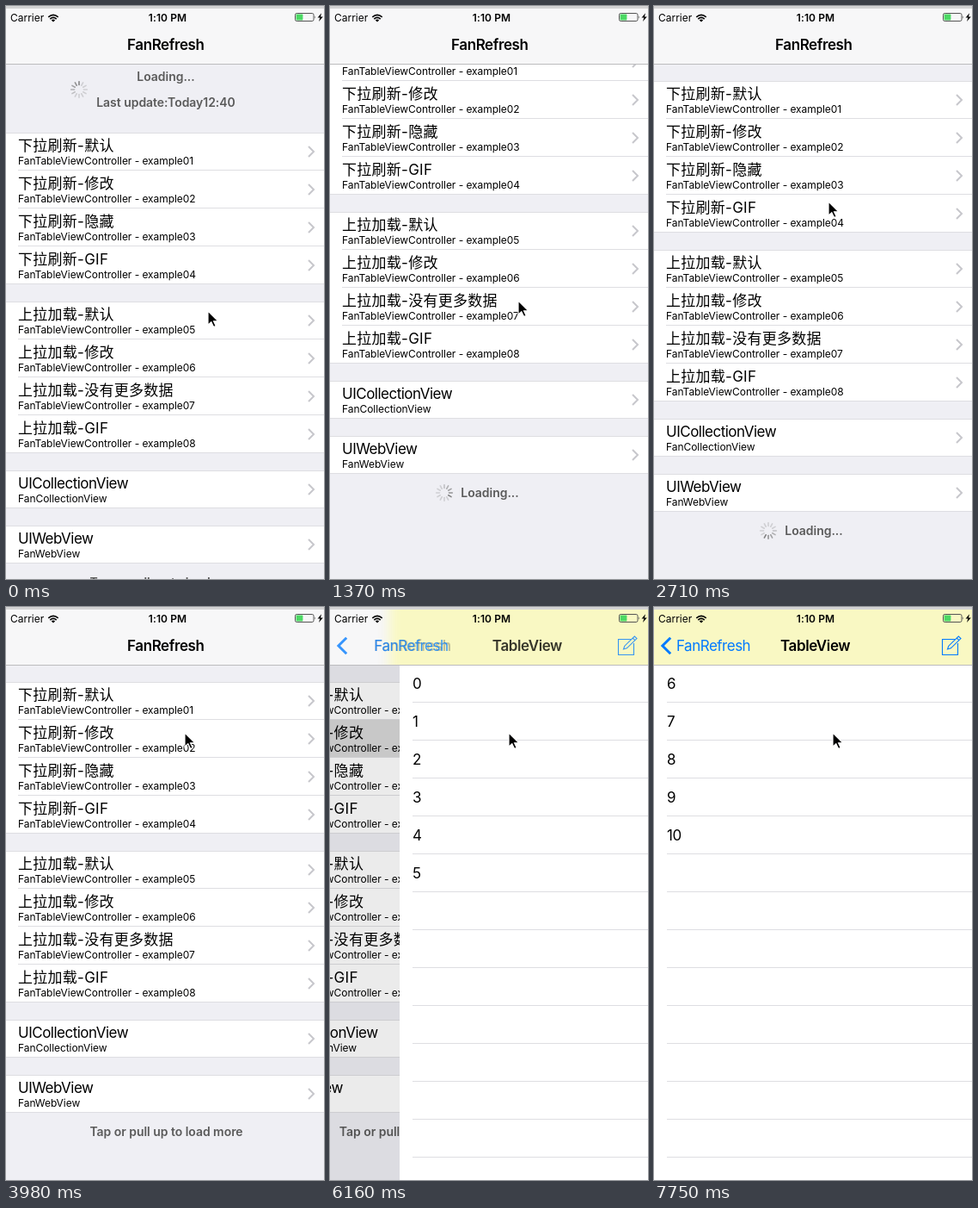
Write an HTML page that moves like this. It is 370 px wide and 665 px high and loops after 8 s.

```html
<!DOCTYPE html>
<html lang="zh-CN">
<head>
<meta charset="utf-8">
<title>Pull to refresh</title>
<style>
html, body { margin: 0; width: 100%; height: 100%; overflow: hidden; background: #fff; }
#stage { position: relative; width: 370px; height: 665px; overflow: hidden; font-family: Inter, "Noto Sans CJK SC", "Noto Sans CJK", sans-serif; color: #000; }
#stage div, #stage svg { position: absolute; }
svg { overflow: visible; }
.view { left: 0; top: 0; width: 370px; height: 665px; overflow: hidden; }
.layer { left: 0; top: 0; width: 370px; height: 100%; }
#list { background: #efeff4; }
#table { background: #fff; }
#dim { background: #000; }
#nav { left: 0; top: 3px; width: 370px; height: 64px; overflow: hidden; background: #f7f7f8; }
#tint { left: -12px; top: -14px; width: 394px; height: 110px; background: #f9f8c3; filter: blur(7px); }
.text { white-space: pre; line-height: 20px; height: 20px; }
.mid { transform: translateX(-50%); }
.main { font-size: 17px; letter-spacing: -.5px; }
.cjk { letter-spacing: .27px; }
.sub { font-size: 12px; letter-spacing: -.06px; }
.title { font-size: 17px; font-weight: 600; letter-spacing: -.4px; }
.hint { font-size: 14px; font-weight: 600; letter-spacing: -.04px; color: #5a5a5a; }
.red { color: #ff2a12; }
.blue { color: #007aff; }
.status { font-size: 12px; }
.bold { font-weight: 600; letter-spacing: .1px; }
</style>
</head>
<body>
<div id="stage">
  <div class="view" id="list"><div class="layer" id="listBody"></div><div class="layer" id="dim"></div></div>
  <div class="view" id="table"><div class="layer" id="tableBody"></div></div>
  <div id="nav"><div id="tint"></div></div>
  <div class="layer" id="bar"></div>
  <svg id="cursor" width="14" height="21" style="left:0;top:0">
    <path d="M0 0V16.2L3.8 12.8L6.6 18.6L9.3 17.4L6.6 11.8H11.8Z" fill="#000" stroke="#fff" stroke-width="1.2"/>
  </svg>
</div>
<script>
const LOOP = 8000;
const $ = id => document.getElementById(id);

// Start, end and number of picture changes
const BURSTS = [[50, 520, 7], [760, 1190, 7], [1370, 2130, 12], [2190, 2990, 13], [3100, 3860, 13],
  [3920, 3980, 2], [5840, 6580, 11], [6700, 7490, 12], [7580, 7750, 3]];

const CURSOR = [[0, 235, 354], [50, 234, 357], [520, 209, 443], [740, 209, 442], [760, 208, 441],
  [1190, 219, 342], [2190, 219, 342], [2560, 207, 220], [2990, 190, 252], [3100, 189, 250],
  [3860, 208, 149], [3980, 208, 146]];

function add(parent, html) {
  parent.insertAdjacentHTML("beforeend", html);
  return parent.lastElementChild;
}
function text(parent, str, x, y, cls) {
  return add(parent, `<div class="text ${cls}" style="left:${x}px;top:${y - 10}px">${str}</div>`);
}
function box(parent, x, y, w, h, color) {
  return add(parent, `<div style="left:${x}px;top:${y}px;width:${w}px;height:${h}px;background:${color}"></div>`);
}
function art(parent, x, y, shapes) {
  return add(parent, `<svg width="1" height="1" style="left:${x}px;top:${y}px" fill="none">${shapes}</svg>`);
}
function spinner(parent, x, y) {
  let spokes = "";
  for (let i = 0; i < 12; i++) {
    const alpha = Math.max(.25, .85 - i * .12);
    spokes += `<path d="M0 -5.5V-9.3" transform="rotate(${-30 * i})" opacity="${alpha}"/>`;
  }
  return art(parent, x, y, `<g stroke="#707070" stroke-width="1.6" stroke-linecap="round">${spokes}</g>`);
}
function group(parent) {
  return add(parent, '<div class="layer"></div>');
}

// First screen
const listBody = $("listBody");
const listHead = group(listBody);
text(listHead, "Loading...", 186, 22, "hint mid");
text(listHead, "Last update:Today12:40", 186, 52, "hint mid");
const spins = [spinner(listHead, 85, 37)];

const example = n => "FanTableViewController - example0" + n;
const SECTIONS = [
  ["默认", "修改", "隐藏", "GIF"].map((s, i) => ["下拉刷新-" + s, example(i + 1)]),
  ["默认", "修改", "没有更多数据", "GIF"].map((s, i) => ["上拉加载-" + s, example(i + 5)]),
  [["UICollectionView", "FanCollectionView"]],
  [["UIWebView", "FanWebView"]]
];
const LINE = "#dedee2";
const cells = [];
let sectionTop = 87;
for (const rows of SECTIONS) {
  const height = rows.length * 44;
  rows.forEach(([name, detail], i) => {
    const y = sectionTop + i * 44;
    cells.push(box(listBody, 0, y, 370, 44, "#fff"));
    if (i) box(listBody, 14, y - 1, 356, 1, LINE);
    text(listBody, name, 14, y + 15, "main" + (/[^\x00-\x7f]/.test(name) ? " cjk" : ""));
    text(listBody, detail, 14, y + 33, "sub");
    art(listBody, 352, y + 21.5, '<path d="M0 -6L6 0L0 6" stroke="#c7c7cc" stroke-width="2"/>');
  });
  box(listBody, 0, sectionTop, 370, 1, LINE);
  box(listBody, 0, sectionTop + height - 1, 370, 1, LINE);
  sectionTop += height + 20;
}
const idleFoot = group(listBody);
text(idleFoot, "Tap or pull up to load more", 186.5, 609, "hint mid");
const busyFoot = group(listBody);
text(busyFoot, "Loading...", 186, 609, "hint mid");
spins.push(spinner(busyFoot, 133, 608.5));

// Second screen
const tableBody = $("tableBody");
box(tableBody, 0, 7, 370, 60, "#ff0");
const tableHead = group(tableBody);
text(tableHead, "正在刷新数据中...", 186.5, 22, "hint red mid");
text(tableHead, "2017-04-01 12:00:00", 186.5, 52, "hint red mid");
spins.push(spinner(tableHead, 74, 37));
const numbers = [];
for (let i = 0; i < 14; i++) {
  numbers.push(text(tableBody, "", 15, 89 + 44 * i, "main"));
  box(tableBody, 15, 110 + 44 * i, 355, 1, LINE);
}

// Bars on top
const bar = $("bar");
box(bar, 0, 0, 370, 3, "#d3d3d4");
box(bar, 0, 67, 370, 1, "#bcbcbe");
text(bar, "Carrier", 5, 13.5, "status");
text(bar, "1:10 PM", 188, 13.5, "status bold mid");
art(bar, 55.3, 17.5, `<g stroke="#000" stroke-width="1.7">
  <path d="M-5.7 -5.2Q0 -10.2 5.7 -5.2"/><path d="M-3.7 -2.9Q0 -6.3 3.7 -2.9"/></g>
  <path d="M0 .6L-2.2 -1.5Q0 -3.3 2.2 -1.5Z" fill="#000"/>`);
art(bar, 336, 8, `<rect x=".5" y=".5" width="21.5" height="9" rx="1.8" stroke="#555"/>
  <rect x="1.6" y="1.6" width="7.8" height="6.8" rx=".6" fill="#4cd964"/>
  <path d="M23 3.3Q24.6 5 23 6.7Z" fill="#555"/>
  <path d="M31 .3L26.6 5.6H29.3L28 10L32.8 4.4H30Z" fill="#000"/>`);
const oldTitle = text(bar, "FanRefresh", 141, 45, "title");
const newTitle = text(bar, "TableView", 147, 45, "title");
const backTitle = text(bar, "FanRefresh", 26, 45, "main blue");
const icons = group(bar);
art(icons, 9, 45, '<path d="M10.2 -9.3L.9 0L10.2 9.3" stroke="#007aff" stroke-width="3"/>');
art(icons, 335, 33, `<g stroke="#007aff" stroke-width="1.1"><path d="M15 4.5H.5V22.5H18.5V9"/>
  <path d="M6.5 16L7.8 12.2L19.3 1L22 3.6L10.4 14.8Z M17.2 3L19.9 5.7"/></g>`);

// Motion
const clamp = x => Math.min(1, Math.max(0, x));
const part = (t, a, b) => clamp((t - a) / (b - a));
const smooth = x => x * x * (3 - 2 * x);
const easeOut = x => 1 - (1 - x) ** 3;
const toHalf = x => Math.round(x * 2) / 2;

function snap(t) {
  let last = 0;
  for (const [a, b, n] of BURSTS) {
    if (t < a) break;
    const gap = (b - a) / (n - 1);
    last = a + Math.min(n - 1, Math.floor((t - a) / gap + 1e-6)) * gap;
  }
  return last;
}
function cursorAt(t) {
  const i = CURSOR.findIndex(k => k[0] > t);
  if (i < 0) return CURSOR[CURSOR.length - 1].slice(1);
  const [t0, x0, y0] = CURSOR[i - 1], [t1, x1, y1] = CURSOR[i];
  const p = part(t, t0, t1);
  return [Math.round(x0 + (x1 - x0) * p), Math.round(y0 + (y1 - y0) * p)];
}
function listOffset(t) {
  if (t < 760) return 60 * (1 - smooth(part(t, 20, 520)));
  if (t < 1350) return -45 * easeOut(part(t, 760, 1190));
  if (t >= 2190) return 0;
  const k = .0102 * (t - 1350);
  return -45 * (1 + k) * Math.exp(-k);
}
function tableOffset(t) {
  return 60 * (smooth(part(t, 6220, 6640)) - smooth(part(t, 7500, 7750)));
}
const move = (el, x, y) => { el.style.transform = `translate(${x}px,${y}px)`; };
const fade = (el, a) => { el.style.opacity = a; };

function draw(time) {
  const t = snap(time);
  const a = toHalf(listOffset(t)), b = toHalf(tableOffset(t));
  const push = easeOut(part(t, 5930, 6450));
  const slide = Math.round(370 * (1 - push));

  move(listBody, 0, a);
  fade(listHead, clamp(a / 25));
  const busy = t >= 1370 && t < 2860;
  fade(idleFoot, busy ? 0 : 1);
  fade(busyFoot, busy ? 1 : 0);
  cells[1].style.background = t >= 5840 ? "#d9d9d9" : "#fff";

  move($("list"), -111 * push, 0);
  fade($("dim"), .1 * push);
  move($("table"), slide, 0);
  move(tableBody, 0, b);
  fade(tableHead, clamp(b / 25));
  const fresh = t >= 7580;
  numbers.forEach((el, i) => {
    el.textContent = fresh ? (i < 5 ? i + 6 : "") : (i < 6 ? i : "");
  });

  // Yellow header shining through the bar
  move($("tint"), slide, b);
  fade($("tint"), push > 0 ? clamp((60 - b) / 8) : 0);

  move(oldTitle, -115 * push, 0);
  fade(oldTitle, 1 - push);
  move(backTitle, 115 * (1 - push), 0);
  fade(backTitle, push);
  move(newTitle, 190 * (1 - push), 0);
  fade(newTitle, push);
  fade(icons, push);

  const turn = 30 * Math.floor(t * 12 / 1000);
  for (const s of spins) s.firstElementChild.setAttribute("transform", `rotate(${turn})`);
  move($("cursor"), ...cursorAt(t));
}

const start = performance.now();
function tick() {
  draw((performance.now() - start) % LOOP);
  requestAnimationFrame(tick);
}
tick();
</script>
</body>
</html>
```
